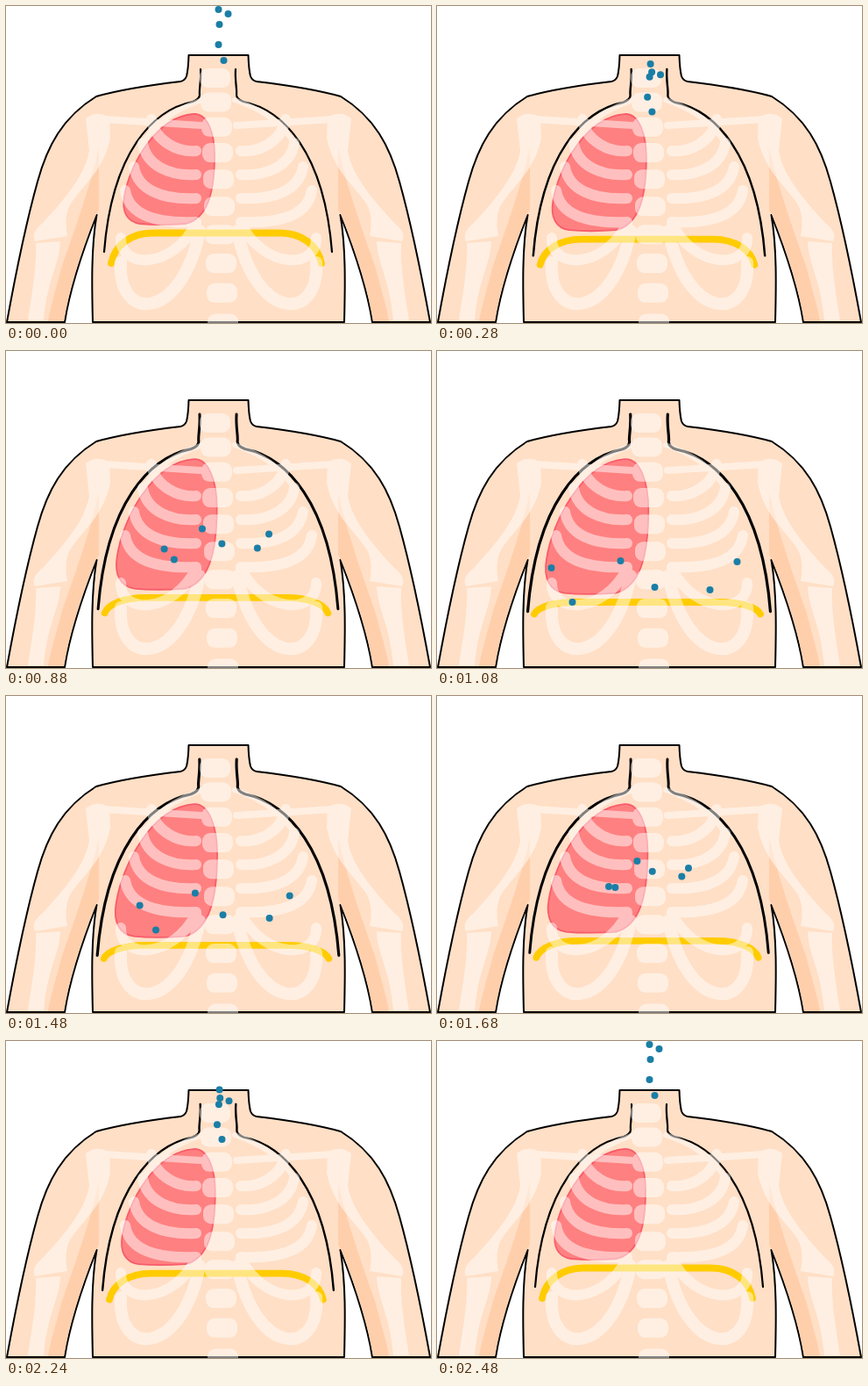
An HTML page for the animation above (2720 ms loop, 485 px wide and 361 px high).

```html
<!DOCTYPE html>
<html lang="en">
<head>
<meta charset="utf-8">
<title>Breathing</title>
<style>
  html, body { margin: 0; width: 100%; height: 100%; overflow: hidden; background: #fff; }
  svg { display: block; width: 100vw; height: 100vh; }
  path { stroke-linejoin: round; vector-effect: non-scaling-stroke; }
</style>
</head>
<body>
<svg viewBox="0 0 485 361">
  <defs>
    <g id="body">
      <path fill="#ffdfc6" stroke="#000" stroke-width="2" d="M243 56H208.500Q208 72 206 80Q204 85 199 86C165 90 135 94 103 103C64 127 47 160 36 200C22 250 11 305 1 360H67C73 322 85 285 103.500 238C97 275 98 320 99 360H243"/>
      <path fill="#ffcfac" d="M106 160C98 200 80 250 64 296C57 322 50 345 48 359H66C72 322 84 283 102.500 238L106 232Z"/>
    </g>
    <g id="bones">
      <path d="M91 128Q104 118 118 127L119 150C112 185 92 200 76 222Q65 236 70 262L33 268Q28 258 42 247C62 225 90 195 95 165Z"/>
      <path d="M34 270L62 268C61 295 47 310 43 358H25C31 320 35 295 34 270Z"/>
      <g id="ribs" fill="none" stroke="#fff" stroke-width="12" stroke-linecap="round">
        <path stroke-width="8" d="M112 129L222 136"/>
        <path stroke-width="6" d="M224 107C192 118 172 132 156 156"/>
        <path d="M131 264C130 300 190 300 217 248"/>
        <path stroke-width="14" d="M131 292C127 360 200 360 221 256"/>
      </g>
    </g>
  </defs>
  <use href="#body"/>
  <use href="#body" transform="matrix(-1 0 0 1 485 0)"/>
  <path id="lung" fill="#ff8080" stroke="#f85c6c" stroke-width="1.8" d="M214 123C230 122 238 145 238 170C238 215 229 242 205 248Q175 250 153 248C138 246 132 234 135 217C141 180 172 126 214 123Z"/>
  <g id="chest" fill="none" stroke="#000" stroke-linecap="round">
    <path id="wall" d="M222 72C223 85 220 96 221 101Q221 106 213 109C168 118 121 166 112 280"/>
    <use href="#wall" transform="matrix(-1 0 0 1 484 0)"/>
  </g>
  <path id="diaphragm" fill="none" stroke="#fc0" stroke-width="7.8" stroke-linecap="round"/>
  <g fill="#fff" opacity=".5">
    <use href="#bones"/>
    <use href="#bones" transform="matrix(-1 0 0 1 485 0)"/>
    <g id="spine"></g>
  </g>
  <g id="dots" fill="#1a7ea6" transform="translate(.5)"></g>
</svg>
<script>
const $ = id => document.getElementById(id);
const STEP = 40, STEPS = 27, LOOP = 2720, EXHALE = 1400;
const lerp = (a, b, p) => a + (b - a) * p;

function add(parent, tag, attrs) {
  const el = document.createElementNS('http://www.w3.org/2000/svg', tag);
  for (const k in attrs) el.setAttribute(k, attrs[k]);
  return $(parent).appendChild(el);
}

// Each rib sits lower and further out than the one above.
for (let i = 0; i < 4; i++) {
  const x = 166 - 10 * i, y = 129 + 27 * i;
  add('ribs', 'path', { d: `M${x} ${y}C${x + 4} ${y + 26} ${x + 32} ${y + 38} 217 ${y + 36}` });
}

// Vertebrae spread out slightly towards the bottom.
for (let i = 0; i < 10; i++)
  add('spine', 'rect', { x: 221 + i, y: 71 + 27 * i + 0.45 * i * i, width: 35, height: 22, rx: 9 });

// Air particles: where each one starts, passes its bend and ends.
const BEND = 17 / STEPS;
const dots = [
  { from: [243, 21], bendY: 166, to: [209, 239] },
  { from: [243, -7], bendY: 170, to: [248, 269] },
  { from: [253, 9], bendY: 177, to: [311, 272] },
  { from: [242, 4], bendY: 177, to: [342, 240] },
  { from: [242, 44], bendY: 189, to: [154, 286] },
  { from: [248, 62], bendY: 204, to: [130, 247] }
].map(dot => ({ ...dot, el: add('dots', 'circle', { r: 4 }) }));

function scaleAbout(id, x, y, sx, sy) {
  $(id).setAttribute('transform', `translate(${x} ${y}) scale(${sx} ${sy}) translate(${-x} ${-y})`);
}

function drawDiaphragm(p) {
  const left = lerp(120, 111, p), end = lerp(293, 299.5, p), top = lerp(258.5, 286, p);
  const flat = lerp(167, 158, p), bend = lerp(top, end, 0.4), mirror = x => 480 - x;
  $('diaphragm').setAttribute('d',
    `M${left} ${end}C${left + 4} ${bend} ${flat - 24} ${top} ${flat} ${top}H${mirror(flat)}` +
    `C${mirror(flat - 24)} ${top} ${mirror(left + 4)} ${bend} ${mirror(left)} ${end}`);
}

function draw(p) {
  scaleAbout('lung', 213, 122, lerp(1, 1.13, p), lerp(1, 1.22, p));
  scaleAbout('chest', 242, 71, lerp(1, 1.065, p), lerp(1, 1.08, p));
  $('chest').setAttribute('stroke-width', lerp(2.2, 3.2, p));
  drawDiaphragm(p);

  // Particles fall steadily and fan out late.
  for (const { from, bendY, to, el } of dots) {
    el.setAttribute('cx', lerp(from[0], to[0], p ** 2.7));
    el.setAttribute('cy', p < BEND ? lerp(from[1], bendY, p / BEND)
                                   : lerp(bendY, to[1], (p - BEND) / (1 - BEND)));
  }
}

const start = performance.now();
function tick() {
  const t = (performance.now() - start) % LOOP;
  const inhale = Math.min(STEPS, Math.floor(t / STEP));
  const exhale = Math.max(0, Math.floor((t - EXHALE) / STEP));
  draw(Math.max(0, inhale - exhale) / STEPS);
  requestAnimationFrame(tick);
}
tick();
</script>
</body>
</html>
```
